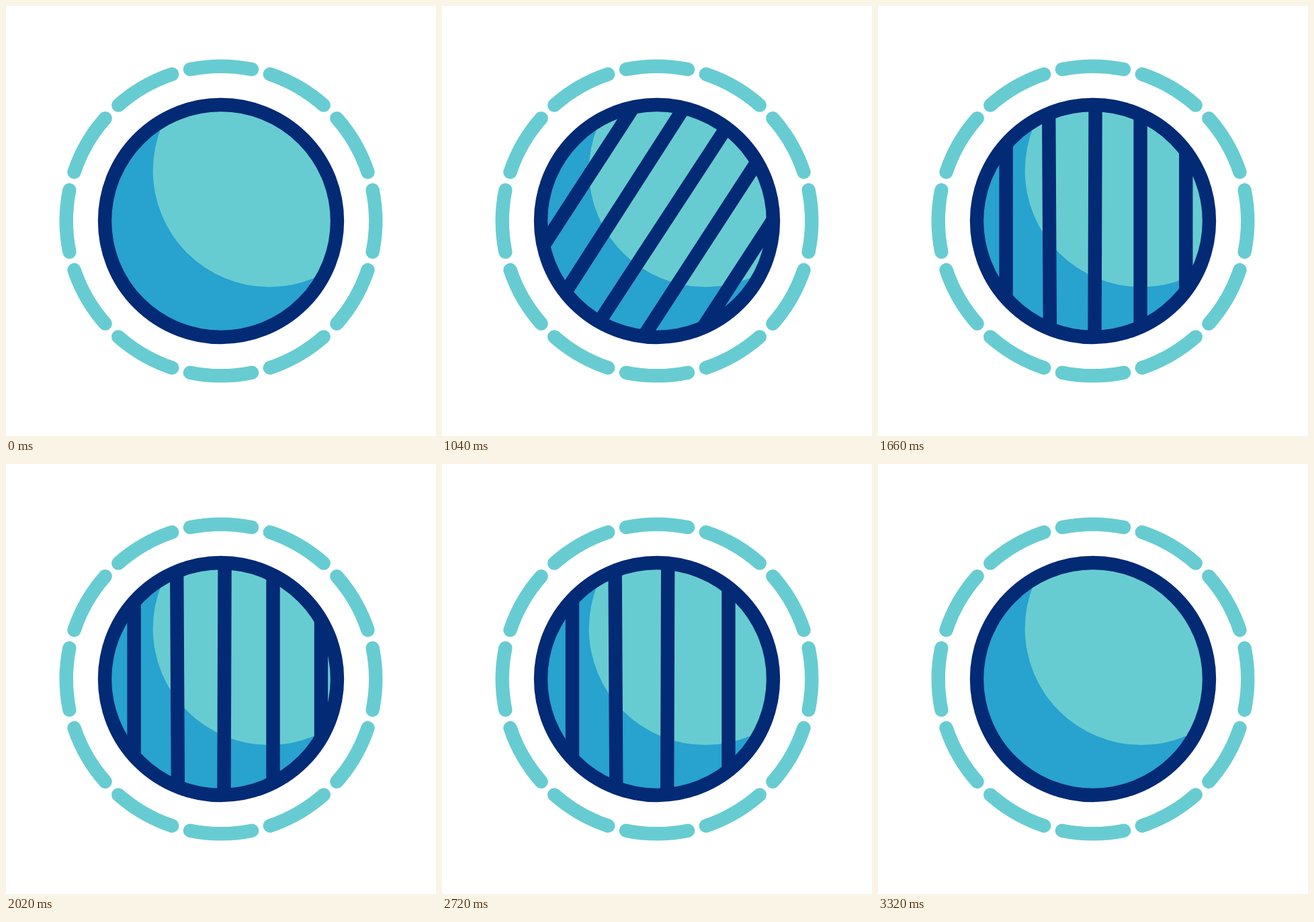
Animation, 640 px wide and 640 px high, one loop 3.6 s. Source, as an HTML page:

```html
<!DOCTYPE html>
<html lang="en">
<head>
<meta charset="utf-8">
<title>Striped planet</title>
<style>
  html, body { margin: 0; width: 100%; height: 100%; overflow: hidden; background: #fff; }
  svg { display: block; width: 100vw; height: 100vh; }
  .line { fill: none; stroke-width: 20.4; stroke-linecap: round; }
  .navy { stroke: #032a75; }
  .teal { stroke: #67ccd1; }
</style>
</head>
<body>
<svg viewBox="0 0 640 640">
  <defs>
    <clipPath id="disc"><circle cx="320" cy="320" r="173"/></clipPath>
  </defs>
  <circle class="line teal" cx="320" cy="320" r="230.3" pathLength="360"
          stroke-dasharray="23.1 6.9" stroke-dashoffset="11.55"/>
  <g clip-path="url(#disc)">
    <circle cx="320" cy="320" r="173" fill="#28a2ce"/>
    <circle cx="392" cy="245" r="173.3" fill="#67ccd1"/>
    <g id="stripes" class="line navy"></g>
  </g>
  <circle class="line navy" cx="320" cy="320" r="173"/>
</svg>
<script>
const LOOP = 3600;
const TILT = 33.7;
// x: upright position, lean: sideways slant, drift: slow travel before the exit
const stripes = [
  { x: 190.6, lean: 0, drift: 0 },
  { x: 255, lean: -1, drift: 0 },
  { x: 322.7, lean: 0.6, drift: 9.6 },
  { x: 389.3, lean: 0, drift: 33.7 },
  { x: 456.3, lean: 0, drift: 52 }
];

const group = document.getElementById('stripes');
for (const s of stripes) {
  s.el = document.createElementNS('http://www.w3.org/2000/svg', 'path');
  s.el.setAttribute('d', `M${s.x + s.lean} 120L${s.x - s.lean * 1.2} 540`);
  group.append(s.el);
}

const span = (t, from, to) => Math.max(0, (t - from) / (to - from));
const ease = p => (1 - Math.cos(Math.PI * Math.min(p, 1))) / 2;

function draw(t) {
  const rise = 368 * (1 - ease(span(t, 0, 780)));
  const angle = TILT * (1 - ease(span(t, 998, 1471)));
  const drift = span(t, 1480, 2720) ** 1.7;
  const exit = 330 * span(t, 2560, 3300) ** 3;
  group.setAttribute('transform', `rotate(${angle} 300 328) translate(0 ${rise})`);
  for (const s of stripes) {
    s.el.setAttribute('transform', `translate(${s.drift * drift + exit} 0)`);
  }
}

const start = performance.now();
function tick() {
  draw((performance.now() - start) % LOOP);
  requestAnimationFrame(tick);
}
tick();
</script>
</body>
</html>
```
